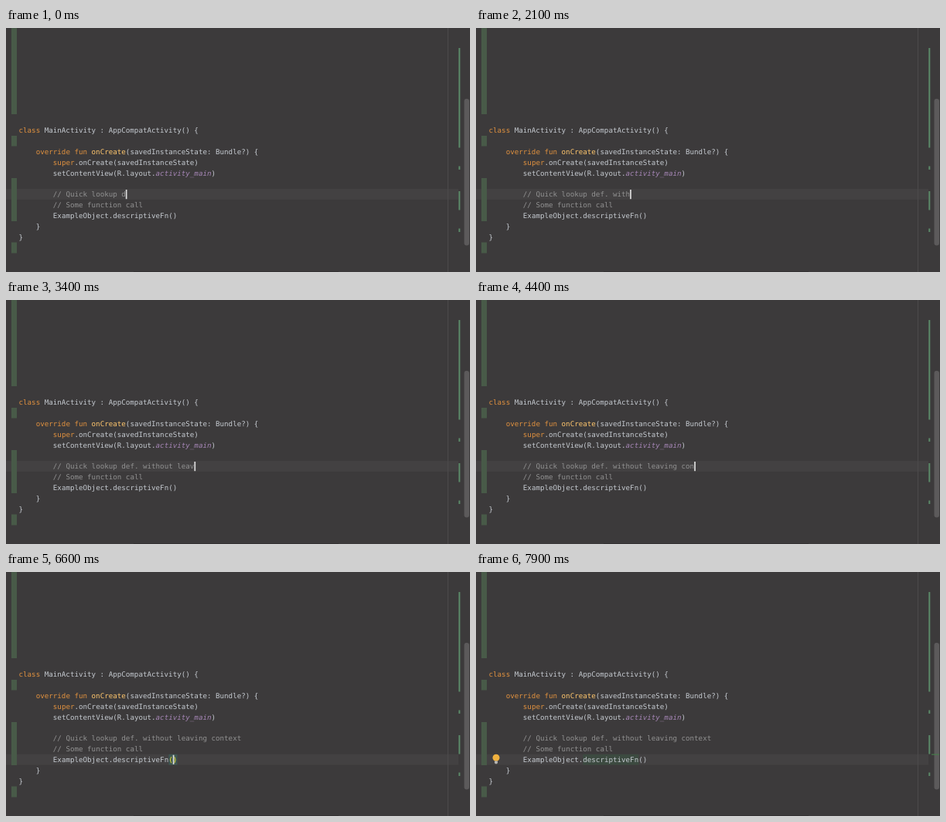
Recreate the animation shown at these times as an HTML page. Size 600 by 317 pixels, loop 8000 ms.

```html
<!DOCTYPE html>
<html lang="en">
<head>
<meta charset="utf-8">
<style>
  html, body { margin: 0; width: 100%; height: 100%; overflow: hidden; background: #3c3a3b; }
  svg { display: block; width: 600px; height: 317px; }
  text { font: 9.2px "DejaVu Sans Mono", monospace; fill: #c5cad0; white-space: pre; text-rendering: geometricPrecision; }
  .key { fill: #e0913f; }
  .fn { fill: #ffc66d; }
  .res { fill: #a686b6; font-style: italic; }
  .note { fill: #919191; }
  .brace { fill: #ffef28; }
  .gutter { fill: #485a48; }
  .stripe { fill: #5b8968; }
</style>
</head>
<body>
<svg viewBox="0 0 600 317">
  <rect id="row" width="585" height="13.8" fill="#434142"/>
  <path class="gutter" d="M7 0h7v112h-7zM7 140h7v13.5h-7zM7 195h7v56h-7zM7 278.5h7v14h-7z"/>
  <rect x="571" width="1" height="317" fill="#4c4a4b"/>
  <path class="stripe" d="M585.3 26h2v129.5h-2zM585.3 179.5h2v4.5h-2zM585.3 212h2v24.5h-2zM585.3 260.5h2v4.5h-2z"/>
  <rect x="592.5" y="92" width="6.5" height="190.5" rx="3" fill="#5c5a5b"/>
  <rect x="165" y="316" width="265" height="1" fill="#333132"/>
  <g id="usage">
    <rect id="usageBox" height="13.8" fill="#3c4a40"/>
    <rect x="589" y="236.5" width="10" height="1.2" fill="#477d4b"/>
    <circle cx="26" cy="241.3" r="4.5" fill="#efb13f"/>
    <path d="M24 245.5h4v2.5l-1 1.2h-2l-1-1.2z" fill="#b5b5b3"/>
  </g>
  <rect id="braceBox" height="13.8" fill="#3f5652"/>
  <g id="code"></g>
  <rect id="caret" width="1.7" height="12.2" fill="#dedede"/>
</svg>
<script>
const $ = id => document.getElementById(id);
const LOOP = 8000, BLINK = 500, CHAR = 5.54, LINE = 13.85;
const COMMENT_ROW = 6, CALL_ROW = 8;
const colX = col => 16.5 + col * CHAR;
const rowY = row => 126 + row * LINE;
const set = (el, attrs) => { for (const name in attrs) el.setAttribute(name, attrs[name]); };
const show = (el, on) => el.setAttribute("visibility", on ? "visible" : "hidden");

const comment = "// Quick lookup def. without leaving context";
// Each line: row, indent, then [text, style] runs
const lines = [
  [0, 0, ["class", "key"], [" MainActivity : AppCompatActivity() {"]],
  [2, 4, ["override fun ", "key"], ["onCreate", "fn"], ["(savedInstanceState: Bundle?) {"]],
  [3, 8, ["super", "key"], [".onCreate(savedInstanceState)"]],
  [4, 8, ["setContentView(R.layout."], ["activity_main", "res"], [")"]],
  [COMMENT_ROW, 8, [comment, "note"]],
  [7, 8, ["// Some function call", "note"]],
  [CALL_ROW, 8, ["ExampleObject.descriptiveFn"], ["()"]],
  [9, 4, ["}"]],
  [10, 0, ["}"]]
];
const runs = {};
for (const [row, indent, ...parts] of lines) {
  $("code").insertAdjacentHTML("beforeend",
    `<text x="${colX(indent)}" y="${rowY(row) + 10.2}">` +
    parts.map(([text, style = ""]) => `<tspan class="${style}">${text}</tspan>`).join("") + "</text>");
  runs[row] = $("code").lastChild.children;
}
const typed = runs[COMMENT_ROW][0], braces = runs[CALL_ROW][1];

// Moments when each further character of the comment is typed
const START = 17;
const keyTimes = [100, 200, 800, 1000, 1400, 1600, 1900, 2100,
  2300, 2400, 2600, 2800, 3000, 3100, 3300, 3400,
  3600, 3700, 3900, 4000, 4200, 4300, 4400, 4600, 4800, 5000, 5200];
// Caret steps: time, row, column
const steps = [[0, COMMENT_ROW, START + 8],
  ...keyTimes.map((time, i) => [time, COMMENT_ROW, START + 9 + i]),
  [6000, 7, 29], [6150, CALL_ROW, 37], [6400, CALL_ROW, 36],
  [6800, CALL_ROW, 35], [6900, CALL_ROW, 34], [7000, CALL_ROW, 33]];

set($("braceBox"), { x: colX(35), y: rowY(CALL_ROW), width: 2 * CHAR });
set($("usageBox"), { x: colX(22), y: rowY(CALL_ROW), width: 13 * CHAR });

function draw(now) {
  const t = now % LOOP;
  const [since, row, col] = steps.findLast(step => step[0] <= t);
  const length = START + keyTimes.filter(time => time <= t).length;
  const text = comment.slice(0, length);
  if (typed.textContent !== text) typed.textContent = text;

  const matched = row === CALL_ROW && col >= 35;
  braces.setAttribute("class", matched ? "brace" : "");
  show($("braceBox"), matched);
  show($("usage"), t >= 7400);
  set($("row"), { y: rowY(row) });
  set($("caret"), { x: colX(col) - 0.2, y: rowY(row) + 0.9 });
  show($("caret"), Math.floor((t - since) / BLINK) % 2 === 0);
  requestAnimationFrame(() => draw(performance.now()));
}
draw(0);
</script>
</body>
</html>
```
